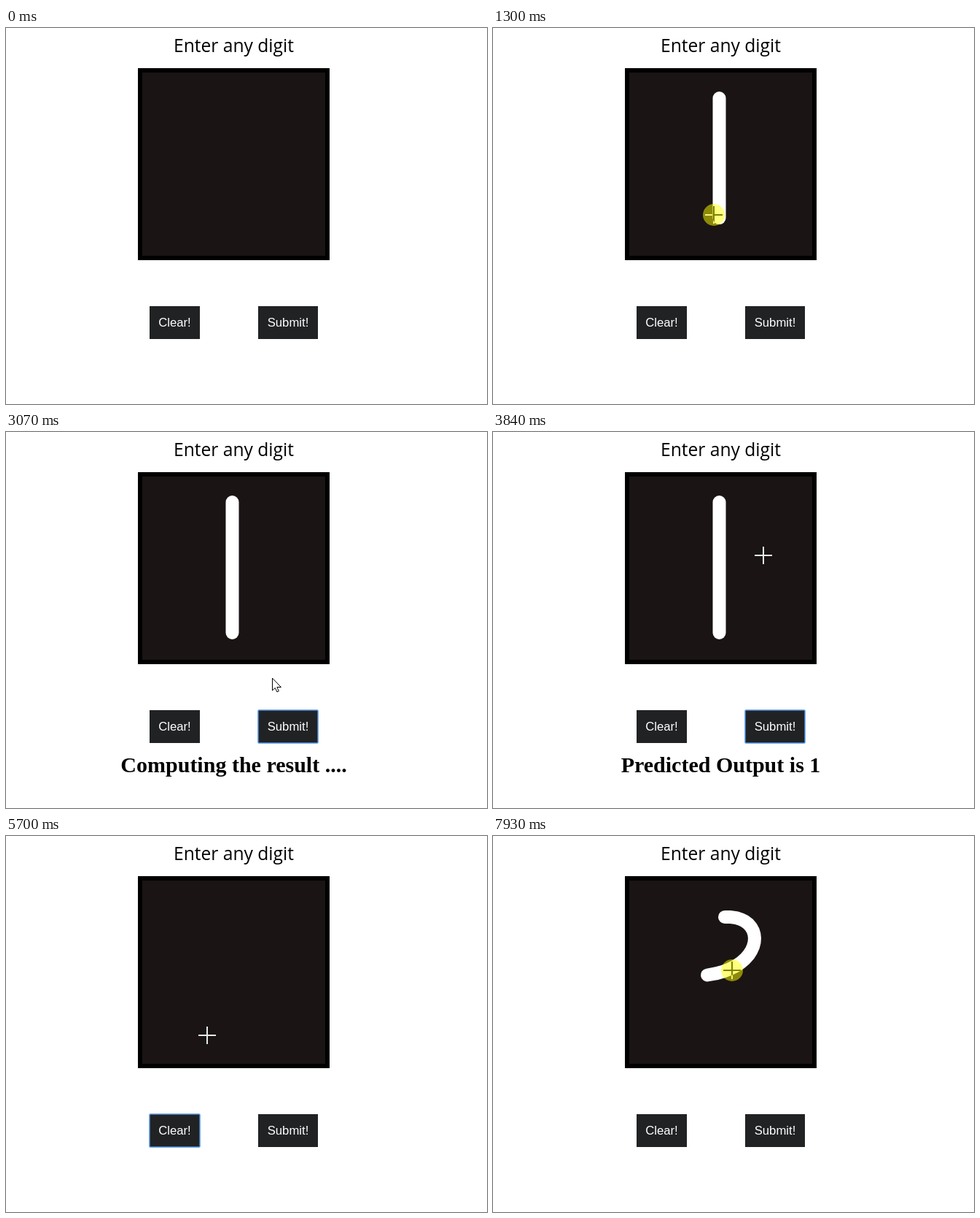
Animation of 660 by 515 pixels, one loop 8 s. Source, as an HTML page with a canvas:

```html
<!DOCTYPE html>
<html lang="en">
<head>
<meta charset="utf-8">
<title>Digit recognition</title>
<style>
  html, body { margin: 0; width: 100%; height: 100%; overflow: hidden; background: #fff; }
  canvas { display: block; }
</style>
</head>
<body>
<canvas id="stage" width="660" height="515"></canvas>
<script>
const ctx = document.getElementById('stage').getContext('2d');
const LOOP = 8000, TICK = 76.92, PEN_OFFSET = 7.5, PEN_LAG = 8;

const within = (v, a, b) => v >= a && v < b;
const mix = (a, b, u) => a + (b - a) * u;
const clamp = u => Math.max(0, Math.min(1, u));
const bezier = (a, b, c, d, u) =>
  (1 - u) ** 3 * a + 3 * (1 - u) ** 2 * u * b + 3 * (1 - u) * u * u * c + u ** 3 * d;

// Handwriting: pen position for u from 0 to 1.
const one = { start: 923, end: 1334, pen: u => [310.5, mix(96, 275, u)] };
const two = {
  start: 7461, end: 7846,
  pen: u => [bezier(318, 377, 375, 294, u), bezier(111, 108, 180, 190.5, u)]
};

const go = (start, end, x, y) => ({
  start, end,
  path(u, from) {
    const e = u * u * (3 - 2 * u);
    return [mix(from[0], x, e), mix(from[1], y, e)];
  }
});
const write = ({ start, end, pen }) => ({
  start, end, path: u => pen(u).map(v => v - PEN_OFFSET)
});

const moves = [
  go(77, 840, 301, 86),
  write(one),
  go(1400, 1690, 359, 360),
  go(1690, 1846, 376, 397),     // press Submit
  go(2769, 3077, 365, 337),
  go(3077, 3615, 371, 169),
  go(4400, 5150, 258, 395),     // press Clear
  go(5390, 6077, 301, 98),
  go(6310, 6846, 282, 95),
  go(6846, 7100, 300, 113),
  go(7100, 7308, 311, 105),
  write(two),
  go(7846, 7923, 328, 184)
];

function locate(t) {
  let pos = [532, 483];
  for (const { start, end, path } of moves) {
    if (t < start) break;
    pos = path(clamp((t - start) / (end - start)), pos);
  }
  return pos.map(Math.round);
}

function text(str, x, y, font, color) {
  ctx.font = font;
  ctx.fillStyle = color;
  ctx.fillText(str, x, y);
}

function rect(x, y, w, h, color) {
  ctx.fillStyle = color;
  ctx.fillRect(x, y, w, h);
}

function trail({ start, end, pen }, t) {
  if (t < start - 1) return;
  const done = clamp((t - PEN_LAG - start) / (end - start));
  ctx.beginPath();
  for (let i = 0; i <= 20; i++) ctx.lineTo(...pen(done * i / 20));
  ctx.lineWidth = 18;
  ctx.lineCap = ctx.lineJoin = 'round';
  ctx.strokeStyle = '#fff';
  ctx.stroke();
}

function button(label, x, w, ring, ringWidth) {
  rect(x, 381, w, 45, '#212224');
  if (ring) {
    ctx.strokeStyle = ring;
    ctx.lineWidth = ringWidth;
    ctx.beginPath();
    ctx.roundRect(x, 381, w, 45, 1);
    ctx.stroke();
  }
  text(label, x + w / 2, 409, '16.7px "Liberation Sans", Arial, sans-serif', '#fff');
}

const ARROW = new Path2D('M0 0V16.5L3.8 13L6.4 18.5L8.8 17.4L6.4 12H11.5Z');
const HAND = new Path2D('M-1.5 1Q0 -1 1.5 1V7Q3 5.5 4.5 7.5Q6 6.5 7.5 8.5Q9.5 7.5 10.5 10' +
  'V15L8.5 19V22.5H-.5V20L-6 13.5Q-6 10.5 -3.5 11.5L-1.5 13Z');

function icon(path, x, y) {
  ctx.save();
  ctx.translate(x + .5, y + .5);
  ctx.fillStyle = '#fff';
  ctx.strokeStyle = '#000';
  ctx.lineWidth = 1;
  ctx.lineJoin = 'miter';
  ctx.fill(path);
  ctx.stroke(path);
  ctx.restore();
}

// The crosshair inverts whatever lies below it.
function cross(x, y) {
  ctx.globalCompositeOperation = 'difference';
  ctx.fillStyle = '#fff';
  ctx.beginPath();
  ctx.rect(x - 12, y - 1, 24, 2);
  ctx.rect(x - 1, y - 12, 2, 24);
  ctx.fill();
  ctx.globalCompositeOperation = 'source-over';
}

function pointer(t, pressed) {
  const [x, y] = locate(t);
  const onButton = within(y, 381, 426) && (within(x, 197, 266) || within(x, 346, 428));
  if (within(x, 181, 444) && within(y, 55, 318)) cross(x, y);
  else icon(onButton ? HAND : ARROW, x, y);
  if (pressed) {
    ctx.fillStyle = 'rgba(255,255,0,.5)';
    ctx.beginPath();
    ctx.arc(x, y, 15, 0, 7);
    ctx.fill();
  }
}

function draw(t) {
  const submitted = within(t, 1960, 5350), clearing = within(t, 5200, 5350);
  const pressed = within(t, 900, 1420) || within(t, 1880, 2030) || clearing || t > 7430;

  rect(0, 0, 660, 515, '#fff');
  ctx.textAlign = 'center';
  text('Enter any digit', 312.5, 33, '24.6px "Open Sans", "Noto Sans", sans-serif', '#000');
  rect(181, 55, 263, 263, '#000');
  rect(187, 61, 251, 251, '#1a1414');
  if (t < 5350) trail(one, t);
  trail(two, t);

  if (clearing) button('Clear!', 197, 69, '#a9b8ac', 1);
  else button('Clear!', 197, 69, within(t, 5350, 7430) && '#4d90e0', 1.5);
  if (within(t, 1880, 2800)) button('Submit!', 346, 82, '#79a3d6', 1);
  else button('Submit!', 346, 82, within(t, 2800, 5200) && '#4d90e0', 1.5);

  if (submitted) {
    text(t < 3730 ? 'Computing the result ....' : 'Predicted Output is 1',
      312.5, 466, 'bold 30px "Liberation Serif", "Times New Roman", serif', '#000');
  }
  if (t > 60) pointer(t, pressed);
}

function frame(now) {
  const step = Math.min(103, Math.floor((now % LOOP + 8) / TICK));
  draw(step * TICK);
  requestAnimationFrame(frame);
}
requestAnimationFrame(frame);
</script>
</body>
</html>
```
